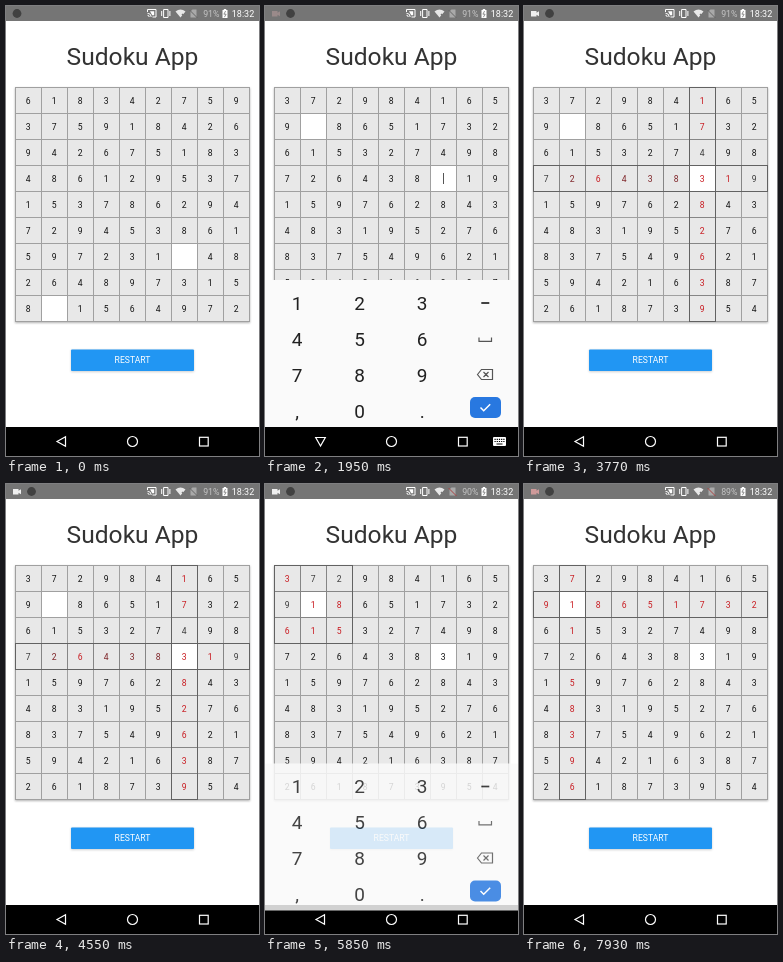
Recreate the animation shown at these times as an HTML page. Size 253 by 450 pixels, loop 8 s.

```html
<!DOCTYPE html>
<html lang="en">
<head>
<meta charset="utf-8">
<title>Sudoku App</title>
<style>
  html, body { margin: 0; width: 100%; height: 100%; overflow: hidden; background: #fff; }
  svg { display: block; width: 100%; height: 100%; }
  text { font-family: Roboto, "Open Sans", sans-serif; text-anchor: middle; }
  .digit { font-size: 8.6px; }
  .key { font-size: 19px; fill: #212121; }
  .line { fill: none; stroke: #fff; stroke-width: 1.2; }
  .icon { fill: none; stroke: #555; stroke-width: 1.2; }
</style>
</head>
<body>
<svg viewBox="0 0 253 450" preserveAspectRatio="none">
  <defs>
    <filter id="soft" x="-10%" y="-10%" width="120%" height="120%"><feGaussianBlur stdDeviation="1.3"/></filter>
  </defs>
  <rect width="253" height="450" fill="#fff"/>

  <g id="status">
    <rect width="253" height="15" fill="#757575"/>
    <path id="camera" d="M7 5h5.500v1.700l2.500-1.500v5l-2.500-1.500v1.700h-5.500z"/>
    <circle id="badge" cy="7.500" r="4.400" fill="#414141"/>
    <path d="M141.500 6v-2.500h8.500v7.500h-3.500M141.500 7.300a3.700 3.700 0 0 1 3.700 3.700M141.500 9.300a1.700 1.700 0 0 1 1.700 1.700" fill="none" stroke="#fff"/>
    <path d="M144 5.300h4.200v4h-2z" fill="#fff"/>
    <path d="M157.600 3.500h4.400v8h-4.400zM155.700 5v5M163.900 5v5" fill="none" stroke="#fff"/>
    <path d="M169.500 5.500q5-3.800 10 0l-5 6z" fill="#e8e8e8"/>
    <path d="M176 8l3 3.500m0-3.500l-3 3.500" stroke="#757575" stroke-width="1.300"/>
    <path d="M186.500 3.500h4v8h-6v-6z" fill="#a9a9a9"/>
    <path id="simSlash" d="M183.500 4l8 8" stroke="#666"/>
    <text id="battery" x="205.300" y="11" font-size="8.800" fill="#c4c4c4"></text>
    <path d="M216.500 4h1.300v-1h2.400v1h1.300v8h-5z" fill="#fff"/>
    <path d="M219.600 5l-1.700 3.200h2.200l-1.700 3" fill="none" stroke="#757575" stroke-width=".8"/>
    <text x="237" y="11" font-size="9" fill="#fff">18:32</text>
  </g>

  <text x="126.500" y="59" font-size="24.600" fill="#333">Sudoku App</text>
  <rect x="9" y="82" width="235" height="235" fill="#888" opacity=".65" filter="url(#soft)"/>
  <g id="board"></g>

  <rect x="65" y="344" width="123" height="22" rx="1" fill="#777" opacity=".35" filter="url(#soft)"/>
  <rect x="65" y="343.500" width="123" height="21.500" rx="1" fill="#2196f3"/>
  <text x="126.500" y="357.400" class="digit" fill="#fff">RESTART</text>

  <rect y="421" width="253" height="29" fill="#000"/>
  <path id="back" class="line" d="M51 435.500l8.500-4.800v9.600z"/>
  <circle class="line" cx="126.500" cy="435.500" r="5"/>
  <rect class="line" x="193.500" y="431.300" width="8.700" height="8.700"/>
  <g id="switcher">
    <rect x="228" y="431" width="13" height="9" rx="1" fill="#fff"/>
    <path d="M229.500 433.300h10M229.500 435.500h10" stroke="#000" stroke-width="1.200" stroke-dasharray="1.200 1"/>
    <path d="M231.500 438h6" stroke="#000"/>
  </g>

  <g id="keyboard">
    <rect y="274" width="253" height="147" fill="#fafafa"/>
    <g id="keys"></g>
    <path d="M216.300 297h8" stroke="#212121" stroke-width="1.700"/>
    <path class="icon" d="M214 331.500v3.800h12.500v-3.800"/>
    <path class="icon" d="M212.500 368.500l4-5h11v10h-11zM218.500 366l5 5m0-5l-5 5"/>
    <rect x="205" y="391" width="31" height="21" rx="5" fill="#2878e0"/>
    <path d="M215.500 401.500l3.200 3.200 6.500-6.500" fill="none" stroke="#fff" stroke-width="1.500"/>
  </g>
</svg>

<script>
const LOOP = 8000, STEP = 26, LEFT = 9, TOP = 81.500;
const $ = id => document.getElementById(id);
const NS = "http://www.w3.org/2000/svg";

function add(parent, tag, attrs, label = "") {
  const el = document.createElementNS(NS, tag);
  for (const k in attrs) el.setAttribute(k, attrs[k]);
  el.textContent = label;
  return parent.appendChild(el);
}

const firstBoard = [
  "618342759", "375918426", "942675183", "486129537", "153786294",
  "729453861", "597231 48", "264897315", "8 1564972"].join("");
const secondBoard = [
  "372984165", "9 8651732", "615327498", "726438 19", "159762843",
  "483195276", "837549621", "594216387", "261873954"].join("");

// Digit tones used while a finished group is lit
const tones = { R: "#c8191f", P: "#bd5a60", D: "#7d2226", K: "#3a3a3a" };
const nine = [...Array(9).keys()];
const row = r => nine.map(i => r * 9 + i);
const col = c => nine.map(i => i * 9 + c);
const box = (r, c) => nine.map(i => (r + Math.floor(i / 3)) * 9 + c + i % 3);

const boxA = [{ cells: box(3, 6), tone: "PRKRRRRRR", bold: true }];
const crossA = [{ cells: row(3), tone: "KDRDDDRRK" }, { cells: col(6), tone: "RRKRRRRRR" }];
const boxB = [{ cells: box(0, 0), tone: "RKKKRRRRR" }];
const crossB = [{ cells: row(1), tone: "RRRRRRRRR" }, { cells: col(1), tone: "RRRKRRRRR" }];

// Each entry changes part of the state from its time on
const script = [
  [0, { board: firstBoard, open: [60, 73], typed: {}, lit: [], caret: -1, camera: "", battery: "91%", keys: 0 }],
  [520, { board: secondBoard, open: [10, 33], camera: "#9a8a8a" }],
  [1820, { caret: 33 }],
  [1950, { keys: 1 }],
  [2470, { caret: -1, typed: { 33: "3" } }],
  [2600, { keys: .84, lit: boxA, camera: "#cf9a9a" }],
  [2730, { keys: 0 }],
  [3770, { lit: crossA, camera: "#f0f0f0" }],
  [4810, { lit: [], caret: 10 }],
  [4940, { keys: 1 }],
  [5590, { caret: -1, typed: { 33: "3", 10: "1" }, battery: "90%" }],
  [5720, { lit: boxB }],
  [5850, { keys: .84 }],
  [5980, { keys: 0 }],
  [6630, { battery: "89%" }],
  [7150, { lit: crossB }],
  [7540, { camera: "#cf9a9a" }]
];

const board = $("board");
const at = i => ({ x: LEFT + i % 9 * STEP, y: TOP + Math.floor(i / 9) * STEP });
const cells = [...Array(81).keys()].map(i => {
  const { x, y } = at(i);
  return add(board, "rect", { x: x + .5, y, width: STEP, height: STEP, stroke: "#a0a0a0" });
});
const frames = add(board, "g", { fill: "none" });
const digits = cells.map((_, i) => {
  const { x, y } = at(i);
  return add(board, "text", { class: "digit", x: x + 13.200, y: y + 16.600 });
});
const caret = add(board, "rect", { width: 1, height: 11, fill: "#555" });

["123", "456", "789", ",0."].forEach((keys, r) => [...keys].forEach((key, c) =>
  add($("keys"), "text", { class: "key", x: 32 + c * 62.600, y: 303.500 + r * 36 }, key)));

function drawBoard(s) {
  cells.forEach((cell, i) => {
    cell.setAttribute("fill", s.open.includes(i) ? "#fff" : "#e8e8e8");
    digits[i].textContent = s.typed[i] || s.board[i].trim();
    digits[i].setAttribute("fill", "#111");
    digits[i].setAttribute("font-weight", 400);
  });
  frames.replaceChildren();
  for (const group of s.lit) {
    group.cells.forEach((i, n) => {
      const { x, y } = at(i);
      add(frames, "rect", { x: x + .5, y, width: STEP, height: STEP, stroke: "#858585" });
      digits[i].setAttribute("fill", tones[group.tone[n]]);
      if (group.bold) digits[i].setAttribute("font-weight", 700);
    });
  }
  for (const { cells: list } of s.lit) {
    const a = at(list[0]), b = at(list[8]);
    add(frames, "rect", { x: a.x + .5, y: a.y, width: b.x - a.x + STEP, height: b.y - a.y + STEP, stroke: "#626262" });
  }
  caret.setAttribute("visibility", s.caret < 0 ? "hidden" : "visible");
  if (s.caret >= 0) {
    const { x, y } = at(s.caret);
    caret.setAttribute("x", x + 13);
    caret.setAttribute("y", y + 7.500);
  }
}

function drawPhone(s) {
  $("battery").textContent = s.battery;
  $("camera").setAttribute("fill", s.camera || "none");
  $("badge").setAttribute("cx", s.camera ? 25.500 : 11);
  $("simSlash").setAttribute("stroke", s.battery === "91%" ? "#666" : "#a44");
  const up = s.keys === 1;
  $("keyboard").setAttribute("opacity", s.keys);
  $("keyboard").setAttribute("transform", `translate(0 ${up ? 0 : 5.500})`);
  $("back").setAttribute("transform", up ? "rotate(-90 55.5 435.500)" : "");
  $("switcher").setAttribute("visibility", up ? "visible" : "hidden");
}

let shown = -1;
function render(t) {
  const step = script.filter(([time]) => time <= t).length;
  if (step === shown) return;
  shown = step;
  const state = Object.assign({}, ...script.slice(0, step).map(entry => entry[1]));
  drawBoard(state);
  drawPhone(state);
}

const start = performance.now();
function tick() {
  render((performance.now() - start) % LOOP);
  requestAnimationFrame(tick);
}
tick();
</script>
</body>
</html>
```
